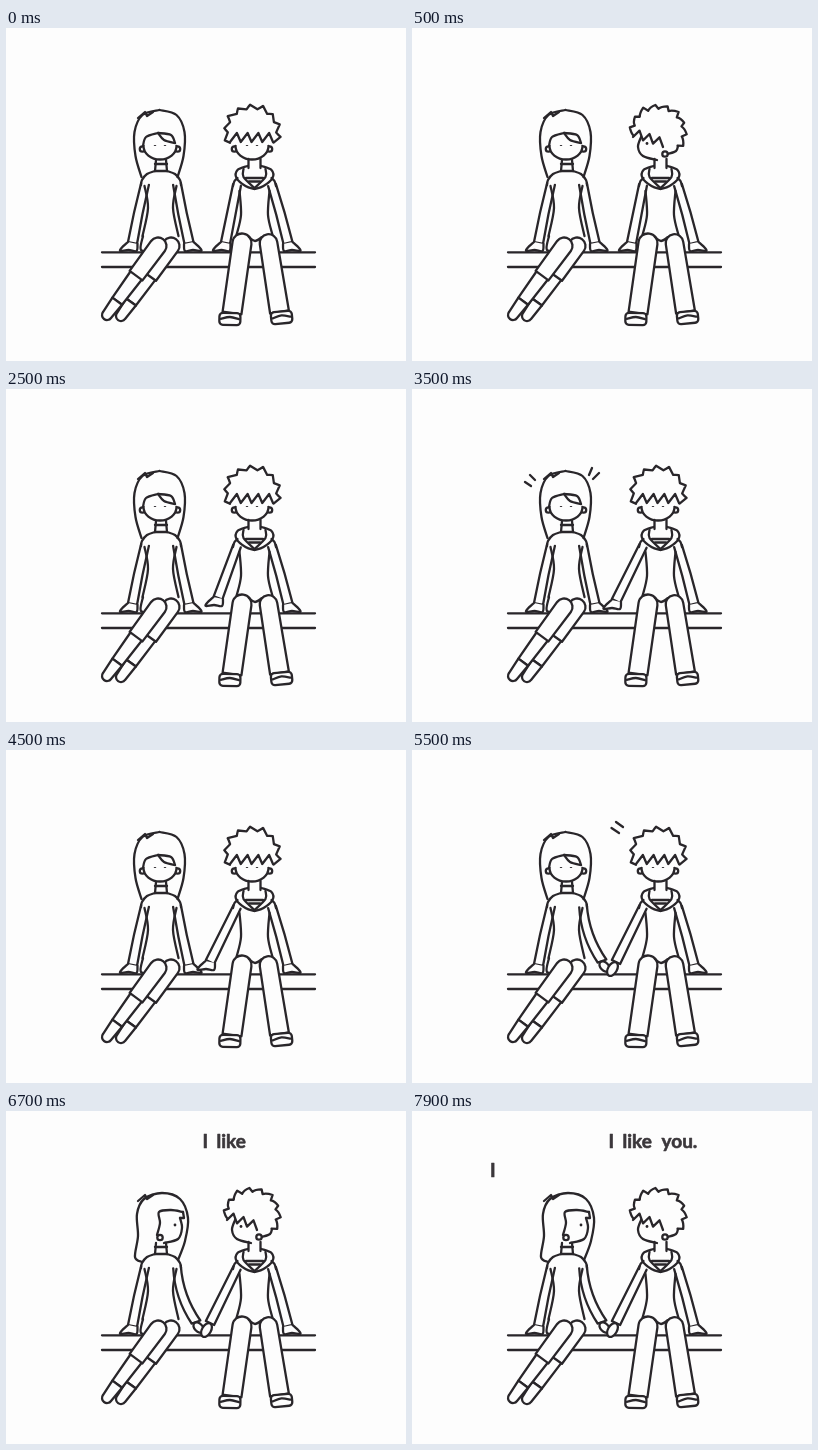
Recreate the animation shown at these times as an HTML page with a canvas. Size 400x333 px, loop 8 s.

```html
<!DOCTYPE html>
<html lang="en">
<head>
<meta charset="utf-8">
<title>Two on a bench</title>
<style>
html, body { margin: 0; width: 100%; height: 100%; overflow: hidden; background: #fdfdfd; }
canvas { display: block; width: 100vw; height: 100vh; }
</style>
</head>
<body>
<canvas id="stage"></canvas>
<script>
const W = 400, H = 333, LOOP = 8000;
const INK = '#29262a', WHITE = '#fdfdfd', TINT = '#f5fbfc';
const { PI, sin, cos, atan2 } = Math;
const canvas = document.getElementById('stage');
const ctx = canvas.getContext('2d');
const ratio = window.devicePixelRatio || 1;
canvas.width = W * ratio;
canvas.height = H * ratio;
let paper = WHITE;

const mix = (a, b, k) => a.map((v, i) => v + (b[i] - v) * k);

function ink(fill = true) {
  ctx.fillStyle = paper;
  if (fill) ctx.fill();
  ctx.stroke();
}

function line(...pts) {
  ctx.beginPath();
  pts.forEach(p => ctx.lineTo(...p));
  ink(false);
}

// Smooth curve through the points.
function curve(pts, fill = false) {
  const at = i => pts[Math.max(0, Math.min(pts.length - 1, i))];
  ctx.beginPath();
  ctx.moveTo(...pts[0]);
  for (let i = 0; i < pts.length - 1; i++) {
    const [a, b, c, d] = [-1, 0, 1, 2].map(k => at(i + k));
    ctx.bezierCurveTo(
      b[0] + (c[0] - a[0]) / 6, b[1] + (c[1] - a[1]) / 6,
      c[0] - (d[0] - b[0]) / 6, c[1] - (d[1] - b[1]) / 6, ...c);
  }
  ink(fill);
}

function oval(x, y, rx, ry, turn = 0, from = 0, to = 2 * PI) {
  ctx.beginPath();
  ctx.ellipse(x, y, rx, ry, turn, from, to);
  ink();
}

// Draws a half and its reflection about the line x = cx.
function mirror(cx, half) {
  for (const side of [-1, 1]) {
    ctx.save();
    ctx.translate(cx, 0);
    ctx.scale(side, 1);
    half();
    ctx.restore();
  }
}

// Tapered tube from a to b, hemmed at b, optionally rounded at a.
function limb(a, b, ra, rb, bend = 0, round = false) {
  const dir = atan2(b[1] - a[1], b[0] - a[0]);
  const off = (p, r) => [p[0] - sin(dir) * r, p[1] + cos(dir) * r];
  const mid = mix(a, b, 0.5), r = (ra + rb) / 2;
  ctx.beginPath();
  ctx.moveTo(...off(a, ra));
  ctx.quadraticCurveTo(...off(mid, bend + r), ...off(b, rb));
  ctx.lineTo(...off(b, -rb));
  ctx.quadraticCurveTo(...off(mid, bend - r), ...off(a, -ra));
  if (round) ctx.arc(...a, ra, dir - PI / 2, dir + PI / 2, true);
  ink();
}

function zigzag(a, b, teeth, depth) {
  const n = teeth * 2;
  line(...Array.from({ length: n + 1 }, (_, i) => {
    const [x, y] = mix(a, b, i / n);
    return [x + (i % 2) * 1.5, y - (i % 2) * depth];
  }));
}

function eye(x, y) {
  ctx.beginPath();
  ctx.arc(x, y, 1.4, 0, 2 * PI);
  ctx.fillStyle = INK;
  ctx.fill();
}

function faceFront(cx) {
  mirror(cx, () => {
    oval(17.5, 121, 2.7, 2.7);
    eye(5, 118.5);
  });
  oval(cx, 118, 16.5, 13.5, 0, 0, PI);
}

function restHand([x, y], side) {
  curve([[-4.5, -1], [-11, 5], [-12, 8], [-4, 7], [4, 8], [5, 1]]
    .map(p => [x - side * p[0], y + p[1]]), true);
}

const arm = (shoulder, wrist, bend) => limb(shoulder, wrist, 4, 4.6, bend);

function bench() {
  line([96, 224.3], [309, 224.3]);
  line([96, 239], [309, 239]);
}

const tuft = () => line([132, 90], [139, 84], [141, 88], [147, 84]);

function girlFront() {
  mirror(153.5, () => curve([[0, 82], [17, 87], [25, 104], [24, 128], [18, 149]]));
  tuft();
  faceFront(154);
  curve([[137, 118], [140, 109], [152, 105]]);
  curve([[152, 105], [158, 112], [169, 115]]);
  curve([[169, 115], [165, 107], [152, 105]]);
}

function girlSide() {
  curve([[136, 151], [129, 146], [132, 125], [131, 103], [138, 88], [156, 82],
    [174, 88], [182, 107], [179, 130], [172, 149]]);
  tuft();
  curve([[151, 124], [154, 112], [153, 101], [165, 99], [177, 101]]);
  line([177, 101], [178, 107], [174, 107]);
  curve([[174, 107], [176, 117], [172, 128], [158, 132]]);
  oval(154, 126.5, 2.7, 2.7);
  eye(169, 114);
}

function girlLeg(knee, toe) {
  const cuff = mix(knee, toe, 0.43), ankle = mix(knee, toe, 0.8);
  limb(cuff, ankle, 7, 6);
  limb(toe, ankle, 5, 6, 0, true);
  limb(knee, cuff, 8.5, 8, 0, true);
}

function girlBody(holding) {
  const wrist = holding ? [190, 211] : [183, 215];
  arm([139, 156], [126.5, 215], 1);
  arm([171, 156], wrist, holding ? 8 : 1);
  restHand([126.5, 215], -1);
  if (!holding) restHand(wrist, 1);
  mirror(155, () => {
    line([5, 132], [6, 143]);
    curve([[6, 143], [14, 146], [19, 152], [20, 157]]);
  });
  line([149, 136], [161, 136]);
  line([149, 143], [161, 143]);
  mirror(154.5, () => curve([[16, 158], [12.5, 180], [18, 208]]));
  curve([[137, 208], [135, 222], [148, 222], [152, 212]], true);
  girlLeg([165, 218], [115, 288]);
  girlLeg([152, 218], [101, 287]);
}

// Swept spikes around the crown, between two angles.
function spikyHair(from, to, sweep) {
  const n = 9, step = (to - from) / n;
  const at = (a, r) => [246 + 26 * r * cos(a), 104 + 25 * r * sin(a)];
  ctx.beginPath();
  ctx.moveTo(...at(from, 0.95));
  for (let i = 0; i < n; i++) {
    const a = from + i * step;
    ctx.quadraticCurveTo(...at(a + step * 0.25, 1.04),
      ...at(a + step * (0.55 + sweep), 1.1 + 0.03 * sin(i * 4)));
    ctx.lineTo(...at(a + step, 0.93));
  }
  ink(false);
}

function boyFront() {
  spikyHair(0.85 * PI, 2.15 * PI, -0.2);
  faceFront(246);
  zigzag([224, 114], [267, 114], 4, 9);
}

function boySide() {
  spikyHair(0.95 * PI, 2.2 * PI, 0.2);
  curve([[229, 109], [226, 119], [231, 128], [245, 132]]);
  zigzag([221, 109], [251, 119], 3, 8);
  curve([[266, 118], [264, 123], [256, 126]]);
  oval(253, 126, 2.7, 2.7);
  eye(235, 115.5);
}

function shoe(x, y, turn) {
  ctx.save();
  ctx.translate(x, y);
  ctx.rotate(turn);
  ctx.beginPath();
  ctx.roundRect(-10.5, 0, 21, 12, 3.5);
  ink();
  curve([[-9, 6], [0, 4], [9, 6]]);
  ctx.restore();
}

function boyBody(wrist, holding) {
  arm([231, 157], wrist);
  arm([266, 157], [282, 215], -1);
  restHand([282, 215], 1);
  if (holding) {
    oval(192.5, 216.5, 6, 4, 0.8);
    oval(200.5, 219, 7.5, 4.5, 2.1);
  } else {
    restHand(wrist, -1);
  }
  mirror(248.5, () => {
    line([6, 131], [6, 140]);
    curve([[17, 150], [20, 153], [21.5, 158]]);
    curve([[15, 163], [13.5, 187], [18, 207]]);
    curve([[7, 138], [17, 142], [18, 150], [9, 158], [0, 161]]);
    curve([[11, 141], [11, 149], [0, 160]]);
  });
  line([240, 150], [257, 150]);
  line([243, 153.5], [254, 153.5]);
  limb([236, 215], [226, 285], 9.5, 9.5, 0, true);
  limb([262.5, 215], [273.5, 284], 8.8, 9.5, 0, true);
  curve([[243, 209], [249, 213], [256, 209]]);
  shoe(224, 285, 0.02);
  shoe(275, 283.5, -0.1);
}

function word(text, x, y) {
  ctx.font = 'bold 19px Lato, sans-serif';
  ctx.fillStyle = ctx.strokeStyle = '#3b373b';
  ctx.lineWidth = 0.6;
  ctx.fillText(text, x, y);
  ctx.strokeText(text, x, y);
}

function draw(t) {
  const during = (from, to) => t >= from && t < to;
  const facing = t >= 6000;
  const holding = t >= 5000;
  const boyWrist = t >= 3000 ? [204, 212] : t >= 2500 ? [212, 209] : [219.5, 215];

  paper = during(1000, 2000) || during(6000, 6500) ? TINT : WHITE;
  ctx.setTransform(canvas.width / W, 0, 0, canvas.height / H, 0, 0);
  ctx.fillStyle = paper;
  ctx.fillRect(0, 0, W, H);
  ctx.strokeStyle = INK;
  ctx.lineWidth = 2.3;
  ctx.lineCap = ctx.lineJoin = 'round';

  bench();
  (facing ? girlSide : girlFront)();
  girlBody(holding);
  (facing || during(500, 1500) ? boySide : boyFront)();
  boyBody(boyWrist, holding);

  if (during(3500, 4500)) {
    line([113, 93], [119, 97]);
    line([118, 86], [123, 91]);
    line([177, 86], [180, 79]);
    line([181, 90], [187, 84]);
  }
  if (during(5500, 6000)) {
    line([204, 72], [211, 77]);
    line([199.5, 78], [207, 83]);
  }

  if (t >= 6500) word('I', 196.5, 37);
  if (t >= 6700) word('like', 210.5, 37);
  if (t >= 6900) word('you.', 249.5, 37);
  if (t >= 7900) word('I', 78, 66);
}

function tick() {
  draw(performance.now() % LOOP);
  requestAnimationFrame(tick);
}
tick();
</script>
</body>
</html>
```
